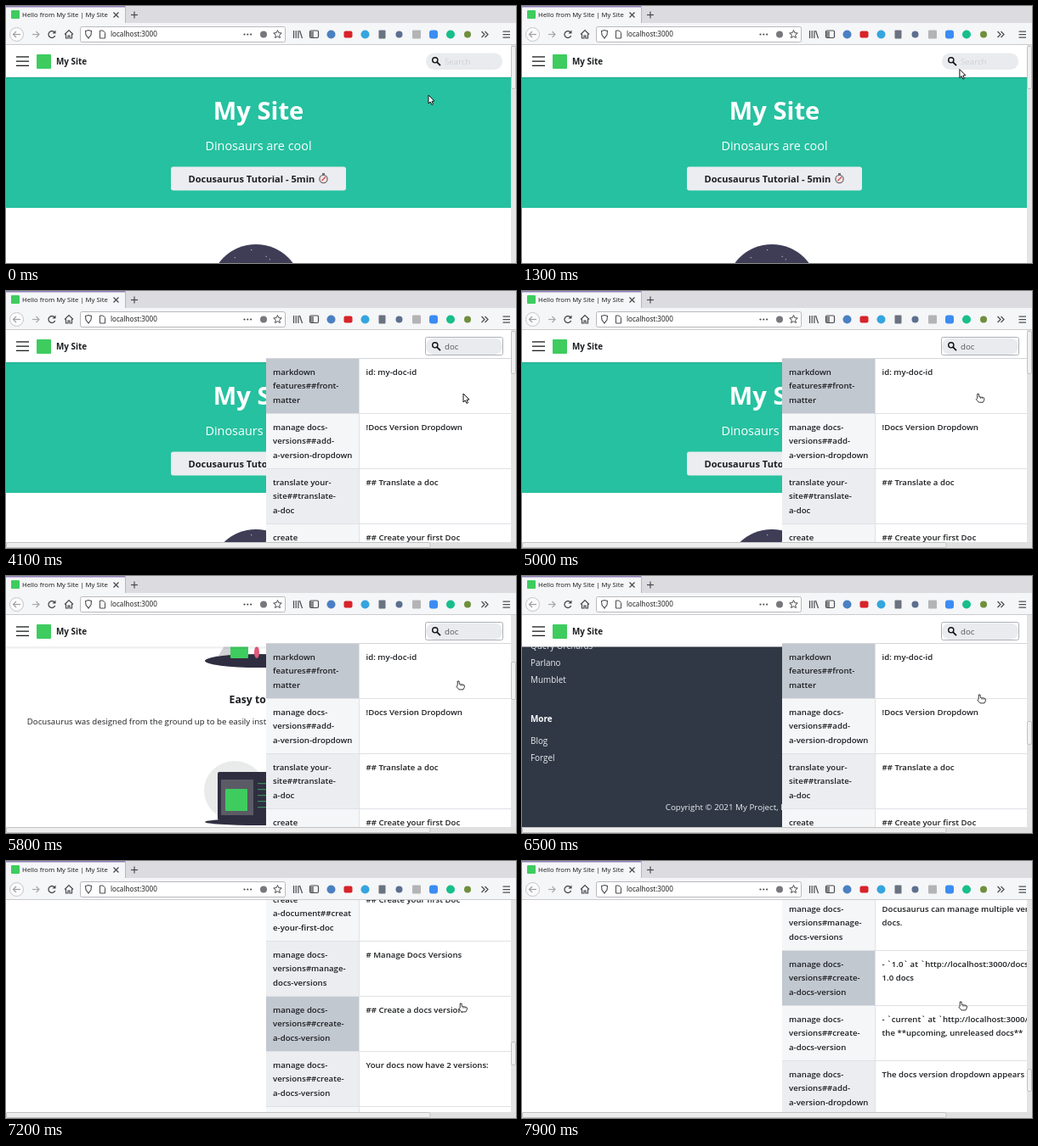
An HTML page with a canvas that plays this animation: 600x303 px, repeating every 8000 ms.

```html
<!DOCTYPE html>
<html lang="en">
<head>
<meta charset="utf-8">
<title>My Site</title>
<style>
html, body { margin: 0; width: 100%; height: 100%; overflow: hidden; background: #fff; }
canvas { display: block; width: 600px; height: 303px; }
</style>
</head>
<body>
<canvas id="stage"></canvas>
<script>
const W = 600, H = 303, LOOP = 8000, STEP = 100;
const TOP = 46, PAGE_W = 594, ROW = 65, LIST_X = 306, SPLIT = 416;
const STICKY_END = 1126;
const T = { focus: 1700, d: 2500, o: 2800, c: 3100, results: 3400, hand: 4900 };

const canvas = document.getElementById('stage');
const dpr = window.devicePixelRatio || 1;
canvas.width = W * dpr;
canvas.height = H * dpr;
const g = canvas.getContext('2d');

const SANS = '"Open Sans", "Noto Sans", sans-serif';
const UI = '"Noto Sans", "Open Sans", sans-serif';
const DARK = '#1c1e21', ICON = '#4a4a4f', GREEN = '#3ecc5f', INK = '#3f3d56', NIGHT = '#2f2e41';

const ROWS = [
  ['markdown|features##front-|matter', 'id: my-doc-id'],
  ['manage docs-|versions##add-|a-version-dropdown', '!Docs Version Dropdown'],
  ['translate your-|site##translate-|a-doc', '## Translate a doc'],
  ['create|a-document##creat|e-your-first-doc', '## Create your first Doc'],
  ['manage docs-|versions#manage-|docs-versions', '# Manage Docs Versions'],
  ['manage docs-|versions##create-|a-docs-version', '## Create a docs version'],
  ['manage docs-|versions##create-|a-docs-version', 'Your docs now have 2 versions:'],
  ['manage docs-|versions#manage-|docs-versions', 'Docusaurus can manage multiple versions|docs.'],
  ['manage docs-|versions##create-|a-docs-version', '- `1.0` at `http://localhost:3000/docs/|1.0 docs'],
  ['manage docs-|versions##create-|a-docs-version', '- `current` at `http://localhost:3000/docs|the **upcoming, unreleased docs**'],
  ['manage docs-|versions##add-|a-version-dropdown', 'The docs version dropdown appears in'],
  ['translate your-|site##translate-|a-doc', 'Translate the doc']
];

const FEATURES = [
  ['Easy to Use', 'Docusaurus was designed from the ground up to be easily installed and used to get your website up and running quickly.'],
  ['Focus on What Matters', 'Docusaurus lets you focus on your docs, and we\u2019ll do the chores. Go ahead and move your docs into the docs directory.'],
  ['Powered by React', 'Extend or customize your website layout by reusing React. Docusaurus can be extended while reusing the same header.']
];

// Keys are [position, value, value, ...]
const MOUSE = [[0, 497, 105], [600, 497, 105], [1500, 520, 66], [1900, 524, 66], [2400, 536, 150], [2800, 538, 121],
  [4900, 538, 121], [5800, 533, 124], [6500, 539, 140], [7200, 536, 168], [7900, 517, 166]];
const SCROLL = [[5000, 0], [5400, 90], [5800, 259], [6500, 908], [7200, 1371], [7900, 1620]];
const THUMB = [[0, 47, 50], [259, 101, 44], [908, 171, 27], [1371, 213, 27], [1620, 245, 26]];

function track(keys, x) {
  if (x <= keys[0][0]) return keys[0].slice(1);
  for (let i = 1; i < keys.length; i++) {
    const a = keys[i - 1], b = keys[i];
    if (x <= b[0]) {
      const k = (x - a[0]) / (b[0] - a[0]);
      return a.slice(1).map((v, j) => v + (b[j + 1] - v) * k);
    }
  }
  return keys[keys.length - 1].slice(1);
}

function rect(x, y, w, h, fill) {
  g.fillStyle = fill;
  g.fillRect(x, y, w, h);
}

function box(x, y, w, h, r, fill, line, lw = 1) {
  g.beginPath();
  g.roundRect(x, y, w, h, r);
  paint(fill, line, lw);
}

function oval(x, y, rx, ry, fill, line, lw = 1) {
  g.beginPath();
  g.ellipse(x, y, rx, ry, 0, 0, 7);
  paint(fill, line, lw);
}

function poly(pts, fill, line, lw = 1, close = true) {
  g.beginPath();
  for (let i = 0; i < pts.length; i += 2) g.lineTo(pts[i], pts[i + 1]);
  if (close) g.closePath();
  paint(fill, line, lw);
}

function paint(fill, line, lw) {
  if (fill) { g.fillStyle = fill; g.fill(); }
  if (line) { g.strokeStyle = line; g.lineWidth = lw; g.stroke(); }
}

function stroke(pts, color = ICON, lw = 1.2) {
  poly(pts, null, color, lw, false);
}

// y is the middle of the lower-case letters
function text(s, x, y, size, color, weight = 400, align = 'left', family = SANS) {
  g.font = `${weight} ${size}px ${family}`;
  g.fillStyle = color;
  g.textAlign = align;
  g.fillText(s, x, y + size * 0.32);
}

function clip(x, y, w, h, draw) {
  g.save();
  g.beginPath();
  g.rect(x, y, w, h);
  g.clip();
  draw();
  g.restore();
}

function chrome() {
  rect(0, 0, W, 20, '#dcdce0');
  rect(0, 20, W, 26, '#f5f6f7');
  rect(0, 0, 140, 20, '#f5f6f7');
  rect(0, 0, 140, 1.5, '#8f80b8');
  rect(140, 0, 1, 20, '#b9b9bd');
  rect(0, 45, W, 1, '#cbcbce');
  box(6, 5, 10, 10, 1, GREEN);
  text('Hello from My Site | My Site', 19, 10.4, 7.7, '#222', 400, 'left', UI);
  stroke([126.5, 7.5, 132.5, 13.5]);
  stroke([132.5, 7.5, 126.5, 13.5]);
  stroke([147, 10.5, 155, 10.5]);
  stroke([151, 6.5, 151, 14.5]);

  oval(12.5, 33.5, 8, 8, '#fbfbfb', '#c5c5c8');
  stroke([17, 33.5, 8.5, 33.5], '#a0a0a4');
  stroke([12, 30, 8.5, 33.5, 12, 37], '#a0a0a4');
  stroke([31, 33.5, 39, 33.5], '#a8a8ac');
  stroke([35.5, 30, 39, 33.5, 35.5, 37], '#a8a8ac');
  g.beginPath();
  g.arc(54, 33.5, 4, 0.4, 5.6);
  paint(null, ICON, 1.3);
  poly([58.5, 28.5, 58.5, 32.5, 54.5, 32.5], ICON);
  stroke([69, 33.5, 74, 28.5, 79, 33.5]);
  stroke([70.5, 33, 70.5, 38, 73, 38, 73, 35, 75, 35, 75, 38, 77.5, 38, 77.5, 33]);

  box(87.5, 24.5, 241, 18, 2, '#fff', '#b9b9bd');
  poly([93.5, 29.5, 97, 28.5, 100.5, 29.5, 100, 34, 97, 38, 94, 34], null, ICON, 1.1);
  poly([110.5, 29, 114, 29, 116.5, 31.5, 116.5, 38, 110.5, 38], null, ICON, 1);
  text('localhost:3000', 123, 33.6, 8.1, '#222', 400, 'left', UI);
  for (let i = 0; i < 3; i++) oval(280.5 + i * 3.8, 33.5, 1.1, 1.1, ICON);
  oval(303, 33.5, 4, 4, '#77777c');
  const star = [];
  for (let i = 0; i < 10; i++) {
    const r = i % 2 ? 2.3 : 5, a = i * Math.PI / 5 - Math.PI / 2;
    star.push(319.5 + r * Math.cos(a), 33.5 + r * Math.sin(a));
  }
  poly(star, null, ICON);

  for (let i = 0; i < 3; i++) stroke([338.5 + i * 2.7, 29, 338.5 + i * 2.7, 38]);
  stroke([345.5, 29, 348.5, 38]);
  box(357.5, 29, 10, 8.5, 1.5, null, ICON, 1.2);
  rect(358, 30, 4, 7, '#88888c');
  oval(382.5, 33.5, 5, 5, '#4a80c2');
  box(397.5, 29.5, 10, 8, 2, '#d8232a');
  oval(422.5, 33.5, 5, 5, '#35a5df');
  box(438.5, 28.5, 8, 10, 1, '#6b7280');
  oval(462.5, 33.5, 4, 4, '#5c6f8f');
  box(478, 28.5, 10, 10, 1, '#b4b4b6');
  box(498, 28.5, 10, 10, 3, '#3b8cf3');
  oval(523, 33.5, 5, 5, '#17bf8a');
  oval(543, 33.5, 4, 4, '#6f8f3c');
  for (const x of [559.5, 563.5]) stroke([x, 30, x + 3.5, 33.5, x, 37]);
  for (let i = 0; i < 3; i++) rect(584.5, 29.5 + i * 3.5, 8.5, 1.2, ICON);
}

function hero() {
  rect(0, 84, PAGE_W, 154, '#26c1a0');
  text('My Site', 297, 125, 29.2, '#fff', 700, 'center');
  text('Dinosaurs are cool', 297, 165, 14.4, '#fff', 400, 'center');
  box(194, 189.5, 206, 28, 3, '#ebedf0');
  text('Docusaurus Tutorial - 5min', 214.5, 204, 11.1, DARK, 700);
  oval(373.5, 204, 4.6, 4.6, '#f4e6e6', '#6b6f75', 1.3);
  rect(372, 197, 3, 2, '#6b6f75');
  stroke([373.5, 204, 376, 201.5], '#d64545');
  stroke([373.5, 204, 371.5, 206], '#d64545');
}

function mountain() {
  g.beginPath();
  g.ellipse(294, 335, 54, 54, 0, Math.PI, 0);
  paint(INK);
  for (let i = 0; i < 16; i++) {
    const a = i * 2.4, r = 46 * Math.sqrt((i + 0.5) / 16);
    rect(294 + r * Math.cos(a), 332 - Math.abs(r * Math.sin(a)), 1, 1, '#e6e6ee');
  }
  poly([250, 353, 268, 322, 282, 353], '#d0d2d6');
  oval(297, 359, 63, 8, NIGHT);
  box(264, 337, 21, 19, 1, GREEN);
  oval(295, 349, 3, 7, '#e05a78');
}

function laptop() {
  oval(269, 512, 36, 35, '#e9eaea');
  box(249, 490, 94, 57, 2, NIGHT);
  rect(253, 499, 38, 42, '#5b5b66');
  for (let i = 0; i < 5; i++) rect(296, 503 + i * 7, 12 + i % 2 * 12, 1.2, '#3a8a5a');
  box(258, 510, 26, 26, 1, GREEN);
  oval(297, 549, 63, 4, NIGHT);
}

function lamp() {
  oval(297, 706, 46, 34, '#e9eaea');
  box(252, 690, 30, 50, 2, INK);
  box(284, 704, 28, 34, 1, GREEN);
  oval(297, 744, 63, 5, NIGHT);
}

function footer() {
  rect(0, 862, PAGE_W, 348, '#303846');
  const link = '#ebedf0';
  const put = (s, y, bold) => text(s, 10, 908 + y, 9.9, bold ? '#fff' : link, bold ? 700 : 400);
  put('Docs', -17, true);
  put('Tutorial', 10);
  put('Community', 56, true);
  put('Query Orchards', 82.5);
  put('Parlano', 102.5);
  put('Mumblet', 122.5);
  put('More', 168.5, true);
  put('Blog', 195);
  put('Forgel', 215);
  text('Copyright © 2021 My Project, Inc. Built with Docusaurus.', 297, 908 + 273, 9.8, link, 400, 'center');
}

function page() {
  hero();
  mountain();
  laptop();
  lamp();
  FEATURES.forEach(([title, body], i) => {
    const y = 405 + i * 194;
    text(title, 297, y, 12.2, DARK, 700, 'center');
    text(body, 297, y + 25.5, 9.7, DARK, 400, 'center');
  });
  footer();
}

function navbar(t) {
  g.save();
  g.shadowColor = 'rgba(0,0,0,.1)';
  g.shadowBlur = 2 * dpr;
  g.shadowOffsetY = dpr;
  rect(0, TOP, PAGE_W, 37.5, '#fff');
  g.restore();
  for (let i = 0; i < 3; i++) rect(12, 59.3 + i * 5.2, 15, 1.3, DARK);
  box(36, 57, 17, 17, 1, GREEN);
  text('My Site', 59, 65.5, 9.9, DARK, 700);

  if (t >= T.focus) box(493.5, 54.5, 91, 21, 2, '#fff', '#adb1b6');
  box(494, 55.5, 90, 19.5, 9.75, '#e9ebee');
  oval(504.8, 63.8, 3.1, 3.1, null, '#111', 1.4);
  stroke([507, 66.2, 511, 70.2], '#111', 1.7);
  const typed = 'doc'.slice(0, (t >= T.d) + (t >= T.o) + (t >= T.c));
  text(typed || 'Search', 516, 65.7, 9.7, typed ? '#55585e' : '#cdd0d6');
  const caret = t >= T.focus && (t < T.d ? Math.floor((t - T.focus) / 500) % 2 === 0 : t < T.c + 500);
  if (caret) rect(516.5 + (typed ? g.measureText(typed).width : 0), 60, 1, 11, '#333');
}

function results(top, mouseY) {
  const lines = (s, x, y) => s.split('|').forEach((l, i) => text(l, x, y + 15.8 + i * 16.5, 9.65, DARK, 600));
  rect(LIST_X, top, PAGE_W - LIST_X, ROW * ROWS.length, '#fff');
  ROWS.forEach(([left, right], i) => {
    const y = top + i * ROW;
    const over = mouseY >= y && mouseY < y + ROW;
    rect(LIST_X, y, SPLIT - LIST_X, ROW, over ? '#c2c8d0' : i % 2 ? '#f5f6f8' : '#ebedf0');
    rect(LIST_X, y + ROW - 1, PAGE_W - LIST_X, 1, '#dfe1e5');
    lines(left, 314, y);
    lines(right, 423.5, y);
  });
  rect(SPLIT - 1, top, 1, ROW * ROWS.length, '#dfe1e5');
  rect(LIST_X, top - 1, PAGE_W - LIST_X, 1, '#d4d6da');
}

function scrollbars(s, wide) {
  rect(PAGE_W, TOP, 6, H - TOP, '#e4e4e4');
  const [y, len] = track(THUMB, s);
  box(PAGE_W + 0.5, y + 0.5, 5, len, 1.5, '#f0f0f0', '#c2c2c2');
  if (wide) {
    rect(0, 296, W, 7, '#e0e0e0');
    box(0.5, 296.5, 498.5, 6, 1.5, '#eeeeee', '#c2c2c2');
  }
}

function pointer(x, y, hand) {
  g.save();
  g.translate(x, y);
  if (hand) {
    g.scale(0.9, 0.9);
    poly([-2, 0, 0, 0, 0.5, 4, 5, 4.5, 7, 5.5, 7, 8, 5.5, 11, 0, 11, -3.5, 7, -2, 6], '#fff', '#222', 1);
    stroke([2.3, 4.5, 2.3, 6.5], '#222', 0.7);
    stroke([4.6, 4.8, 4.6, 6.5], '#222', 0.7);
  } else {
    poly([0, 0, 0, 10, 2.2, 8, 4, 11.5, 5.5, 10.7, 4, 7.3, 7, 7], '#fff', '#111', 1);
  }
  g.restore();
}

function draw(t) {
  const [s] = track(SCROLL, t), [mx, my] = track(MOUSE, t);
  const open = t >= T.results;
  const shift = Math.min(0, STICKY_END - s);
  g.setTransform(dpr, 0, 0, dpr, 0, 0);
  rect(0, 0, W, H, '#fff');
  clip(0, TOP, PAGE_W, H - TOP, () => {
    g.save();
    g.translate(0, -s);
    page();
    g.restore();
    g.save();
    g.translate(0, shift);
    navbar(t);
    g.restore();
    if (open) results(80 + shift, my);
  });
  scrollbars(s, open);
  chrome();
  pointer(mx, my, t >= T.hand);
}

function tick(now) {
  draw(Math.floor(now % LOOP / STEP) * STEP);
  requestAnimationFrame(tick);
}
requestAnimationFrame(tick);
</script>
</body>
</html>
```
